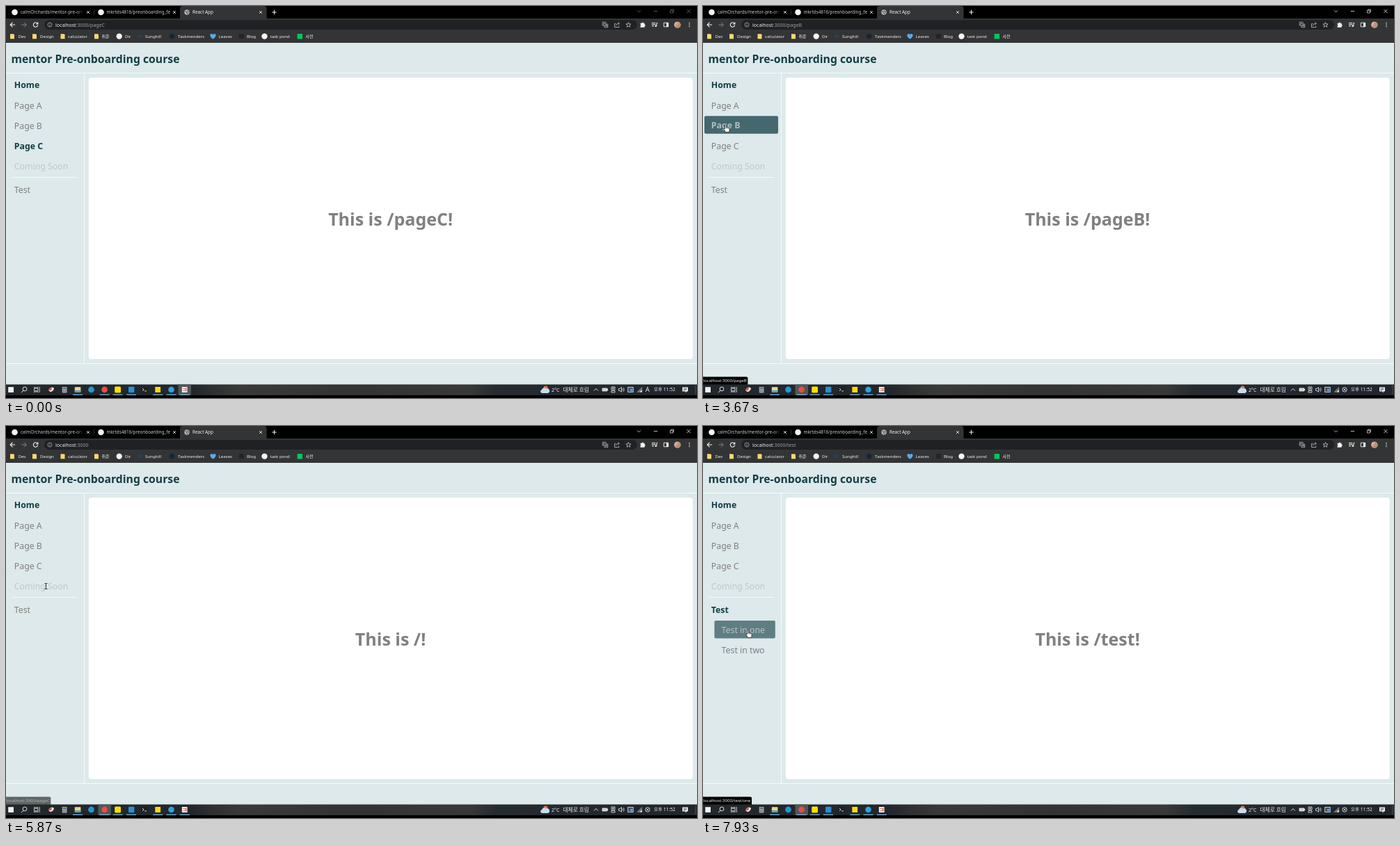
Write an HTML page with a canvas that moves like this. It is 993x564 px and loops after 8 s.

```html
<!DOCTYPE html>
<html lang="ko">
<head>
<meta charset="utf-8">
<title>Page navigation</title>
<style>
html, body { margin: 0; width: 100%; height: 100%; overflow: hidden; background: #000; }
canvas { display: block; width: 993px; height: 564px; }
</style>
</head>
<body>
<canvas id="stage"></canvas>
<script>
const W = 993, H = 564, LOOP = 8000, TICK = 1000 / 15, FADE = 300;
const FONT = '"Noto Sans", "Noto Sans CJK KR", "Noto Sans CJK", sans-serif';
const BG = [221, 233, 234], DARK = [18, 62, 70], GREY = [128, 128, 128];
const PALE = '#bfc9ca', BAR = '#333435';

const canvas = document.getElementById('stage');
const ctx = canvas.getContext('2d');
const dpr = window.devicePixelRatio || 1;
canvas.width = W * dpr;
canvas.height = H * dpr;

// Sidebar rows: label, route, top of the box
const rows = [
  ['Home', '', 100.9], ['Page A', 'pageA', 130], ['Page B', 'pageB', 159.1],
  ['Page C', 'pageC', 188.2], ['Coming Soon', null, 217.3], ['Test', 'test', 251.4],
  ['Test in one', 'test/one', 280.7], ['Test in two', 'test/two', 309.8]
];

// Hover spans: row, enter, leave, cut (a page reload drops the fade)
const hovers = [
  [1, 1235, 2060, true], [1, 2060, 2370], [2, 2625, 3530, true], [2, 3530, 3880],
  [1, 3920, 4090], [0, 4270, 4800, true], [0, 4800, 5235], [1, 5265, 5365],
  [2, 5375, 5460], [3, 5475, 5580], [5, 6480, 7109, true], [5, 7109, 7594], [6, 7825, 9000]
];
const routes = [[0, 'pageC'], [2060, 'pageA'], [3530, 'pageB'], [4800, ''], [7109, 'test']];
const links = [
  [1400, '/pageA'], [2600, '/pageB'], [3920, '/pageA'], [4200, ''], [5265, '/pageA'],
  [5375, '/pageB'], [5475, '/pageC'], [6300, '/test'], [7680, '/test/one']
];
const pointer = [
  [530, 274, 374], [1300, 45, 149.5], [2330, 45, 149.5], [2670, 34, 176], [3700, 34, 176],
  [4330, 42.5, 120.5], [5130, 42.5, 120.5], [5700, 57.5, 230.5], [6130, 57.5, 230.5],
  [6700, 29, 268.5], [7480, 29, 268.5], [7730, 66, 299]
];

const clamp = v => Math.max(0, Math.min(1, v));
const smooth = v => v * v * (3 - 2 * v);
const mix = (a, b, k) => `rgb(${a.map((v, i) => Math.round(v + (b[i] - v) * k))})`;
const latest = (list, t) => list.filter(e => e[0] <= t).pop();

// CSS "ease" curve
function ease(x) {
  if (x <= 0) return 0;
  if (x >= 1) return 1;
  const bez = (s, p, q) => 3 * (1 - s) ** 2 * s * p + 3 * (1 - s) * s * s * q + s ** 3;
  let lo = 0, hi = 1;
  for (let i = 0; i < 20; i++) {
    const m = (lo + hi) / 2;
    if (bez(m, .25, .25) < x) lo = m; else hi = m;
  }
  return bez(lo, .1, 1);
}

function hoverAmount(row, t) {
  let best = 0;
  for (const [r, enter, leave, cut] of hovers) {
    if (r !== row || t < enter || (cut && t >= leave)) continue;
    const up = ease((Math.min(t, leave) - enter) / FADE);
    best = Math.max(best, up * (1 - ease((t - leave) / FADE)));
  }
  return best;
}

function text(str, x, y, size, color, weight = 400, align = 'left') {
  ctx.font = `${weight} ${size}px ${FONT}`;
  ctx.textAlign = align;
  ctx.fillStyle = color;
  ctx.fillText(str, x, y);
}
function box(x, y, w, h, color, r = 0) {
  ctx.fillStyle = color;
  ctx.beginPath();
  ctx.roundRect(x, y, w, h, r);
  ctx.fill();
}
function dot(x, y, r, color) {
  ctx.fillStyle = color;
  ctx.beginPath();
  ctx.arc(x, y, r, 0, 7);
  ctx.fill();
}
function path(x, y, d, stroke, fill, width = 1) {
  ctx.save();
  ctx.translate(x, y);
  const p = new Path2D(d);
  if (fill) { ctx.fillStyle = fill; ctx.fill(p); }
  if (stroke) {
    ctx.strokeStyle = stroke;
    ctx.lineWidth = width;
    ctx.lineJoin = 'round';
    ctx.stroke(p);
  }
  ctx.restore();
}
const cross = (x, y, r, color, width) =>
  path(x, y, `M${-r} ${-r}L${r} ${r}M${r} ${-r}L${-r} ${r}`, color, null, width);
const ring = (x, y, r, color, width = .8) =>
  path(x, y, `M${r} 0A${r} ${r} 0 1 1 ${-r} 0A${r} ${r} 0 1 1 ${r} 0`, color, null, width);
const folder = (x, y, s = 1) =>
  path(x, y, `M${-3 * s} ${-3.5 * s}h${5 * s}l${s} ${s}v${6 * s}h${-6 * s}z`, null, '#fbd86f');

function drawTabs(focused) {
  box(0, 0, W, 18, '#000');
  box(250, 0, 124.5, 19, BAR, [4, 4, 0, 0]);
  dot(12.5, 9, 4.3, '#f4f4f4');
  text('calmOrchards/mentor-pre-onboard', 21, 11.2, 6.35, '#c9ccd0');
  const fade = ctx.createLinearGradient(102, 0, 111, 0);
  fade.addColorStop(0, 'rgba(0,0,0,0)');
  fade.addColorStop(1, '#000');
  box(102, 2, 24, 14, fade);
  box(126, 4.5, .6, 9, '#45474b');
  dot(136.5, 9, 4.3, '#f4f4f4');
  text('mkrtds4816/preonboarding_fe', 144.5, 11.2, 6.35, '#c9ccd0');
  dot(260, 9, 3.7, '#b4b7ba');
  path(260, 9, 'M-2.6 -1.4L0 -.4L-.6 1.6M.8 -2.8L1.4 -.6L3 0M.6 3L1.2 1.2', BAR, null, .8);
  text('React App', 268, 11.2, 6.35, '#f1f3f4');
  for (const x of [118, 242, 366]) cross(x, 9, 1.9, '#e8eaed', .9);
  path(385.5, 9, 'M-3.2 0H3.2M0 -3.2V3.2', '#f1f3f4', null, 1);
  const c = focused ? '#e8eaed' : '#6b6b6b';
  path(909.5, 7.5, 'M-2.5 -1.2L0 1.3L2.5 -1.2', c, null, .8);
  path(933.5, 7.5, 'M-2.6 0H2.6', c, null, .8);
  path(957, 7.5, 'M-2.5 -1.2H1.2V2.5H-2.5zM-1.2 -1.2V-2.5H2.5V1.2H1.2', c, null, .7);
  cross(981, 7.5, 2.6, c, .8);
}

function drawToolbar(route) {
  box(0, 18, W, 35, BAR);
  box(55, 20.3, 852, 13.6, '#202124', 6.8);
  path(9.5, 27, 'M3.6 0H-3.2M0 -3.3L-3.3 0L0 3.3', '#f1f3f4', null, 1.1);
  path(26, 27, 'M-3.6 0H3.2M0 -3.3L3.3 0L0 3.3', '#85878a', null, 1);
  path(42.5, 27, 'M2.7 -1.8A3.2 3.2 0 1 0 3.2 .6M3.3 -3.6V-1H.7', '#f1f3f4', null, 1.1);
  ring(63, 27, 3.1, '#bdc1c6', .7);
  path(63, 27, 'M0 -1.7V-.9M0 -.3V1.8', '#bdc1c6', null, .8);
  const host = 'localhost';
  text(host, 71, 29.5, 7, '#e8eaed');
  const x = 71 + ctx.measureText(host).width;
  text(':3000' + (route ? '/' + route : ''), x, 29.5, 7, '#9aa0a6');

  const c = '#c4c7cb';
  path(861, 27, 'M-3.8 -3.8H1V1H-3.8zM1 -1H3.8V3.8H-1V1M-2.6 -1.8H0M-1.4 -2.6L-2.6 .2M1 2.8L2.2 .2L3.2 2.8', c, null, .7);
  path(878, 27, 'M-1.5 -1.6H-3.4V3.6H2.8V1.6M-1.4 1.2C-1 -1 .6 -1.8 3 -1.8M1.4 -3.6L3.4 -1.8L1.4 0', c, null, .8);
  path(894.5, 27, 'M0 -3.6L1 -1.1L3.6 -1L1.5 .7L2.3 3.3L0 1.8L-2.3 3.3L-1.5 .7L-3.6 -1L-1 -1.1z', c, null, .8);
  const f = '#f1f3f4';
  path(915, 27, 'M-3.4 -2.3H-1.2A1.1 1.1 0 0 1 1 -2.3H2.7V-.3A1.1 1.1 0 0 1 2.7 1.9V3.7H-3.4V1.6A1.1 1.1 0 0 0 -3.4 -.5z', null, f);
  path(932, 27, 'M-4 -2.6H1.4M-4 -.4H1.4M-4 1.8H-1M3 1.6V-2.6H4.4', f, null, 1);
  dot(2 + 932 - .2, 28.8, 1.3, f);
  path(948.5, 27, 'M-3.2 -2.8H3.2V2.8H-3.2z', f, null, .9);
  box(949, 24, 3, 6, f);
  const skin = ctx.createLinearGradient(960, 24, 970, 30);
  skin.addColorStop(0, '#e4d9c8');
  skin.addColorStop(.5, '#c98d78');
  skin.addColorStop(1, '#8fa36a');
  dot(965, 27.2, 4.8, skin);
  for (const d of [-2.6, 0, 2.6]) dot(982, 27 + d, .75, f);
}

function drawBookmarks() {
  const marks = [
    ['Dev', 17.5], ['Design', 49], ['calculator', 89], ['취준', 137.5], ['Dir', 171],
    ['Sunghill', 200], ['Taskmenders', 247], ['Leaves', 305.5], ['Blog', 346],
    ['task pond', 379.5], ['사전', 430.5]
  ];
  for (const [label, x] of marks) text(label, x, 45.7, 6.1, '#eceef0');
  for (const x of [9, 41, 81.5, 130]) folder(x, 43.7);
  dot(162.7, 43.6, 4.2, '#f4f4f4');
  box(188.5, 41.7, 7, 4, '#25415c');
  dot(238.6, 43.6, 3.7, '#14263a');
  path(297.5, 43.8, 'M0 3.8C-6.5 -.6 -4 -4.6 -1.6 -3.8Q-.4 -3.4 0 -2.4Q.4 -3.4 1.6 -3.8C4 -4.6 6.5 -.6 0 3.8z', null, '#55acee');
  box(335, 40, 7, 7, '#242526');
  dot(371.5, 43.6, 4.2, '#f8f8f8');
  box(418.6, 40, 7.4, 7.4, '#03c75a');
}

function drawRow(i, route, t) {
  const [label, own, top] = rows[i];
  const k = hoverAmount(i, t), sub = i > 5, y = top - k;
  if (k > 0) box(sub ? 16.4 : 2, y, sub ? 87.4 : 106, 25.3, mix(BG, DARK, k), 2);
  const active = i === 0 || own === route;
  const color = own === null ? PALE : mix(active ? DARK : GREY, [222, 234, 235], k);
  text(label, sub ? 26.6 : 11.8, y + 17.5, 12.3, color, active ? 700 : 400);
}

function drawPage(route, t) {
  box(0, 53, W, 492, mix(BG, BG, 0));
  text('mentor Pre-onboarding course', 7.6, 81.6, 15.75, mix(DARK, DARK, 0), 700);
  const line = '#f7fafa';
  box(0, 96, W, 1, line);
  box(112, 97, 1, 417, line);
  box(0, 514, W, 1, line);
  box(8, 246, 93.5, 1, line);
  box(118.8, 103, 868, 405, '#fff', 4);
  rows.forEach((_, i) => { if (i < 6 || route === 'test') drawRow(i, route, t); });
  text(`This is /${route}!`, 552.6, 315.6, 25, '#808080', 700, 'center');
}

function drawBubble(t) {
  const shown = clamp((t - 1390) / 130) * (1 - clamp((t - 5780) / 200)) + clamp((t - 6460) / 130);
  const link = latest(links, t);
  if (!link || shown <= 0) return;
  const str = 'localhost:3000' + link[1];
  ctx.globalAlpha = shown;
  ctx.font = `400 6.15px ${FONT}`;
  box(0, 533.4, ctx.measureText(str).width + 2, 11.6, '#000', [0, 2, 0, 0]);
  text(str, .3, 541.3, 6.15, '#f1f3f4');
  ctx.globalAlpha = 1;
}

function drawTaskbar(focused, imeOff) {
  const g = ctx.createLinearGradient(0, 0, W, 0);
  [[0, '#23282d'], [.27, '#22272c'], [.3, '#2f3031'], [.34, '#393939'], [.5, '#333'],
   [.67, '#383838'], [.71, '#262b30'], [1, '#20262b']].forEach(s => g.addColorStop(...s));
  box(0, 544.5, W, 15.5, g);
  box(0, 560, W, 4, '#000');
  box(focused ? 132.5 : 247.5, 544.5, 18.5, 15.5, '#51565a');
  const w = '#f1f1f1';
  box(3.2, 548.2, 7.8, 7.8, w);
  ring(27, 551, 2.9, w, .9);
  path(25, 553.2, 'M0 0L-3 3', w, null, 1);
  path(44.5, 552, 'M-4 -1.8H1.5V1.8H-4zM-4 -4V-3H1.5V-4M-4 4V3H1.5V4M3.7 -4V4', w, null, .8);
  path(65, 552, 'M-4 1Q-3 -3 1 -3.5Q4 -3.5 4 -1Q2 3 -1 3.2z', null, '#e9e4e2');
  path(65, 552, 'M-4 1Q-3 -3 1 -3L0 1z', null, '#d25446');
  box(80.8, 548, 6.6, 8.4, '#a9b3ba', .6);
  box(81.8, 549, 4.6, 1.8, '#4e5d68');
  for (let i = 0; i < 6; i++) box(81.9 + i % 3 * 1.6, 552 + (i / 3 | 0) * 2, 1, 1.2, '#4e5d68');
  box(98.8, 548.3, 8.6, 7.4, '#f8d775', .6);
  box(98.8, 553, 8.6, 2.7, '#4aa3dc', .6);
  dot(122.5, 552, 4.4, '#2397d4');
  dot(141.6, 552, 4.4, '#e5503f');
  box(156.2, 547.6, 8.8, 8.8, '#fae100', 1.5);
  box(176, 547.8, 8.4, 8.4, '#2a8fd6', 1);
  box(194.7, 548.2, 8.6, 7.6, '#1d1f21', .6);
  path(199, 552, 'M-3 -2L-.8 0L-3 2M.2 2H3', w, null, .9);
  box(214.3, 548, 7.8, 8, '#ffd814', .6);
  dot(237.5, 552, 4.3, '#2ca5e0');
  box(252.8, 548, 7.8, 8, '#f3efec', .6);
  path(256.7, 552, 'M-2.4 -1.5H0M-2.4 1.5H0M1 -2V2H2.4V-2z', '#c9503f', null, .8);
  for (const x of [103, 141.6, 160.5, 180, 218.2, 237.5, 256.7]) box(x - 7, 558.7, 14, 1.2, '#7cbbe8');

  dot(775.5, 549.6, 3, '#e8743c');
  path(774, 552, 'M-4 5A2.6 2.6 0 0 1 -4 0A3.4 3.4 0 0 1 2 -1.4A3 3 0 0 1 5 5z', null, '#c7dcf0');
  text('2°C', 784, 554.7, 7, w);
  text('대체로 흐림', 800.5, 554.7, 7.7, w);
  path(848, 552, 'M-3 1.5L0 -1.5L3 1.5', w, null, .9);
  path(860.5, 552, 'M-3.5 -2H3.2V2H-3.5zM3.2 -1H4.2V1H3.2', w, '#c9ccce', .8);
  path(872.5, 552, 'M-2.5 -4H2.5V0H-2.5zM-2.5 1.5H2.5V4H-2.5z', w, null, .8);
  dot(872.5, 550, 1, w);
  path(884.5, 552, 'M-4 -1.4H-2.4L0 -3.4V3.4L-2.4 1.4H-4z', w, null, .8);
  path(884.5, 552, 'M1.4 -1.6Q2.6 0 1.4 1.6M2.8 -2.8Q5 0 2.8 2.8', w, null, .7);
  path(897.5, 552, 'M-3.8 -3.5H3.8V3.5H-3.8z', w, '#3d4d62', .8);
  dot(898.5, 552.5, 1.9, '#4b9ff0');
  path(910.5, 552, 'M3.4 -3.6V3.4H-3.6z', '#8f9498', '#6d7377', .5);
  path(910.5, 552, 'M3.4 .2V3.4H.2z', null, w);
  if (imeOff) {
    ring(922, 552, 3.2, w, .8);
    cross(922, 552, 1.5, w, .8);
  } else text('A', 922, 555.3, 9, w, 400, 'center');
  text('오후 11:52', 931, 554.4, 6.6, w);
  path(976, 552, 'M-4 -3.6H4V2.4H1.6V4.4L-.4 2.4H-4z', null, w);
  path(976, 552, 'M-2.6 -1.8H2.6M-2.6 -.4H2.6M-2.6 1H1', '#2a2f34', null, .6);
  box(990.6, 546, .6, 13, '#697075');
}

function drawPointer(t) {
  if (t < 530) return;
  const i = pointer.indexOf(latest(pointer, t));
  const [t0, x0, y0] = pointer[i], [t1, x1, y1] = pointer[i + 1] || [t0 + 1, x0, y0];
  const k = smooth(clamp((t - t0) / (t1 - t0)));
  const x = x0 + (x1 - x0) * k, y = y0 + (y1 - y0) * k;
  if (t > 5580 && t < 6300) {
    path(x, y, 'M-2 -4H-.5Q0 -4 0 -3.4Q0 -4 .5 -4H2M0 -3.5V3.5M-2 4H-.5Q0 4 0 3.4Q0 4 .5 4H2', '#222', null, .9);
  } else if (t < 1235) {
    path(x - 2, y - 5, 'M0 0V8.6L2 6.8L3.3 9.8L4.6 9.2L3.3 6.3H6z', '#111', '#fff', .6);
  } else {
    path(x, y, 'M-2.6 -4.8Q-1.7 -6.2 -.8 -4.8V-1.5Q.2 -2.1 .8 -1.2Q1.8 -1.8 2.4 -.8Q3.8 -1.2 4 .3V2.6Q4 4 3.2 5.6H-1.5Q-2.2 4 -4 1.6Q-4.6 .3 -3.6 .1Q-3 .2 -2.6 1z', '#151515', '#fff', .7);
    path(x, y, 'M-.8 -1.5V.7M.8 -1.2V.8M2.4 -.8V.9', '#333', null, .5);
  }
}

function frame(now) {
  const t = Math.floor((now % LOOP + 4) / TICK) * TICK % LOOP;
  const route = latest(routes, t)[1], focused = t >= 1660;
  ctx.setTransform(dpr, 0, 0, dpr, 0, 0);
  drawTabs(focused);
  drawToolbar(route);
  drawBookmarks();
  drawPage(route, t);
  drawBubble(t);
  drawTaskbar(focused, t >= 2060);
  drawPointer(t);
}

const start = performance.now();
function loop() {
  frame(performance.now() - start);
  requestAnimationFrame(loop);
}
loop();
</script>
</body>
</html>
```
